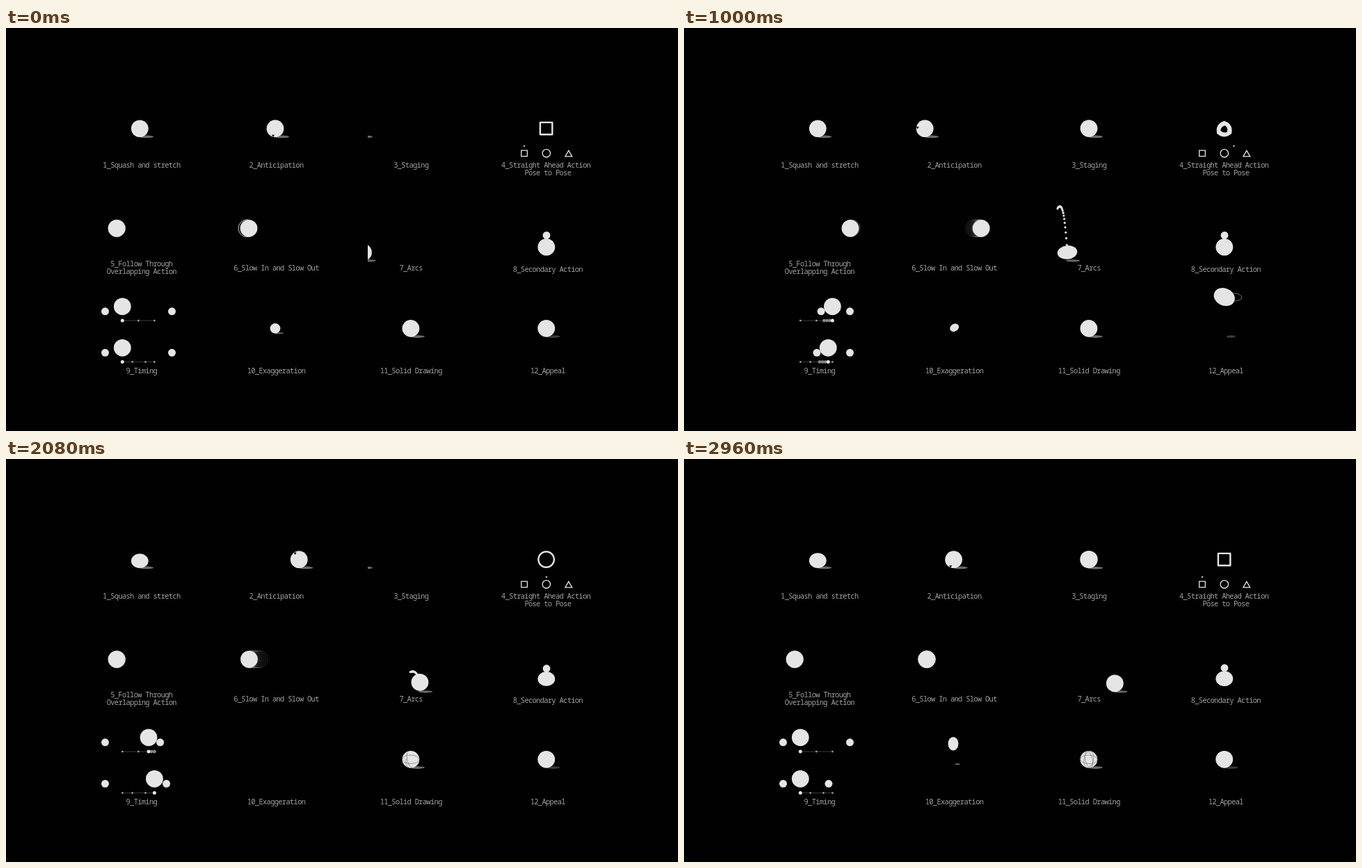
An HTML page with a canvas that plays this animation: 966x580 px, repeating every 3000 ms.

```html
<!DOCTYPE html>
<html lang="en">
<head>
<meta charset="utf-8">
<title>Twelve principles of animation</title>
<style>
  html, body { margin: 0; width: 100%; height: 100%; overflow: hidden; background: #010101; }
  canvas, svg { position: absolute; left: 0; top: 0; }
  text {
    font: 500 10.4px "Noto Sans Mono", "DejaVu Sans Mono", monospace;
    letter-spacing: -.064em; fill: #a2a2a2; text-anchor: middle;
  }
</style>
</head>
<body>
<canvas id="stage" width="966" height="580"></canvas>
<svg width="966" height="580">
  <text x="194.8" y="201.4">1_Squash and stretch</text>
  <text x="388.5" y="201.4">2_Anticipation</text>
  <text x="582.2" y="201.4">3_Staging</text>
  <text x="776" y="201.4">4_Straight Ahead Action</text>
  <text x="778.8" y="212.4">Pose to Pose</text>
  <text x="194.8" y="343.4">5_Follow Through</text>
  <text x="194.8" y="354.4">Overlapping Action</text>
  <text x="388.5" y="349">6_Slow In and Slow Out</text>
  <text x="582.2" y="349">7_Arcs</text>
  <text x="778.8" y="351.4">8_Secondary Action</text>
  <text x="194.8" y="496.5">9_Timing</text>
  <text x="388.5" y="496.5">10_Exaggeration</text>
  <text x="582.2" y="496.5">11_Solid Drawing</text>
  <text x="778.8" y="496.5">12_Appeal</text>
</svg>
<script>
const g = document.getElementById('stage').getContext('2d');
const LOOP = 3000, STEP = 40, R = 12.4, TAU = Math.PI * 2;
const WHITE = '#e5e5e5', GREY = '#6a6a6a', BLACK = '#010101';
const { PI, sin, cos, min, max, abs } = Math;
const clamp = v => min(1, max(0, v));
const mix = (a, b, u) => a + (b - a) * u;
const ramp = (t, start, dur) => clamp((t - start) / dur);
const ease = u => u * u * (3 - 2 * u);
const glide = (t, start, dur) => ease(ramp(t, start, dur));
const pulse = (t, start, dur) => sin(PI * ramp(t, start, dur));

function oval(x, y, rx, ry = rx, rot = 0, from = 0, to = TAU) {
  g.beginPath();
  g.ellipse(x, y, rx, ry, rot, from, to);
}
function ball(x, y, rx = R, ry = rx, rot = 0, color = WHITE) {
  g.fillStyle = color;
  oval(x, y, rx, ry, rot);
  g.fill();
}
function shadow(x, y, rx = 10.5, ry = 1.8, color = GREY) {
  ball(x, y, rx, ry, 0, color);
}
function line(color, width) {
  g.strokeStyle = color;
  g.lineWidth = width;
  g.stroke();
}
function polygon(x, y, r, n, rot) {
  g.beginPath();
  for (let i = 0; i < n; i++) g.lineTo(x + r * cos(rot + i * TAU / n), y + r * sin(rot + i * TAU / n));
  g.closePath();
}
function clipped(x, y, w, h, draw) {
  g.save();
  g.beginPath();
  g.rect(x, y, w, h);
  g.clip();
  draw();
  g.restore();
}

// One jump over phase 0..1: in the air from .16 to .86, squashed on the ground around it.
function jump(p) {
  const q = (p - .16) / .7;
  if (q > 0 && q < 1) {
    const v = abs(2 * q - 1);
    return { dy: -40.3 * (1 - v ** 2.4), ry: R + 5.8 * min(1, 2.2 * v, 5 * (1 - v)) };
  }
  const dip = 2.1 * sin(TAU * ((p + .14) % 1) / .3) ** 2;
  return { dy: dip, ry: R - dip };
}
const shade = ({ dy, ry }) => 5.6 + 4.9 * clamp((37 + dy + ry - R) / 37) ** .65;

function squash(t) {
  const j = jump(t / 1000 % 1);
  shadow(201.8, 156.4, shade(j));
  ball(192.3, 144.6 + j.dy, R, j.ry);
}

// start, duration, distance, turn in degrees
const ROLLS = [[0, 480, 8.5, 54], [540, 620, -59, -397], [1340, 860, 89.5, 501], [2470, 530, -39, -518]];
function anticipation(t) {
  const sum = col => ROLLS.reduce((s, m) => s + m[col] * glide(t, m[0], m[1]), 0);
  const x = 387 + sum(2), a = (106 + sum(3)) * PI / 180;
  shadow(x + 9.7, 156.4);
  ball(x, 144.7);
  polygon(x + 10.6 * cos(a), 144.7 + 10.6 * sin(a), 2.3, 3, PI / 2);
  g.fillStyle = BLACK;
  g.fill();
}

function staging(t) {
  const away = 75 * (1 - glide(t, 40, 440) + glide(t, 1340, 400) - glide(t, 2080, 420));
  const r = R + 1.6 * (pulse(t, 480, 480) + pulse(t, 2510, 480));
  const x = 582 - away, y = 144.6 - 18 * abs(sin(PI * away / 25));
  clipped(520, 80, 130, 90, () => {
    shadow(x + 9.7, 156.4 + r - R, 10.5 * r / R);
    ball(x, y, r);
  });
  const burst = ramp(t, 2510, 220);
  if (burst === 0 || burst === 1) return;
  g.beginPath();
  for (const a of [-.75, -.5, -.25]) {
    for (const d of [17, 21]) g[d < 20 ? 'moveTo' : 'lineTo'](582 + (d + 8 * burst) * cos(a * PI), 144.6 + (d + 8 * burst) * sin(a * PI));
  }
  g.globalAlpha = 1 - burst;
  line(WHITE, 1);
  g.globalAlpha = 1;
}

// Polar outlines: sides, first corner, edge distances, centre shift, corner limit, icon place
const POSES = [
  { n: 4, at: PI / 4, out: 9.9, inn: 7.5, dy: 0, cap: 13.4, x: 745 },
  { n: 0, at: 0, out: 12.4, inn: 10, dy: 0, cap: 20, x: 776.8 },
  { n: 3, at: -PI / 2, out: 6.8, inn: 4.4, dy: 2.9, cap: 13.6, x: 808.8 }
];
function reach(p, edge, a) {
  if (!p.n) return p[edge];
  const w = TAU / p.n, off = ((a - p.at) % w + w) % w;
  return min(p.cap, p[edge] / cos(off - w / 2));
}
function poses(t) {
  const order = [0, 1, 2, 1, 0], k = max(0, Math.floor((t - 25) / 795));
  const u = glide(t, 25 + 795 * k, 400), a = POSES[order[k]], b = POSES[order[k + 1]];
  const bump = sin(PI * u), shrink = 1 - (a.n + b.n === 3 ? .42 : .12) * bump;
  const cx = 776.6, cy = 144.6 + mix(a.dy, b.dy, u);
  g.beginPath();
  for (const edge of ['out', 'inn']) {
    const inner = edge === 'inn', spin = inner ? .25 * bump : 0;
    for (let i = 0; i < 120; i++) {
      const q = i * TAU / 120 - PI / 2, d = mix(reach(a, edge, q), reach(b, edge, q), u);
      const r = inner ? d * shrink : mix(d, 11.3, .5 * bump);
      g[i ? 'lineTo' : 'moveTo'](cx + r * cos(q + spin), cy + r * sin(q + spin));
    }
    g.closePath();
  }
  g.fillStyle = WHITE;
  g.fill('evenodd');

  polygon(745, 180.4, 6.1, 4, PI / 4);
  line(WHITE, 1.3);
  oval(776.8, 180.3, 5.7);
  line(WHITE, 1.3);
  polygon(808.8, 182, 5.7, 3, -PI / 2);
  line(WHITE, 1.3);
  polygon(mix(a.x, b.x, u), 169.8, 1.8, 3, PI / 2);
  g.fillStyle = WHITE;
  g.fill();
}

function swingX(t) {
  return 159.2 + 82.3 * (glide(t, 380, 400) - glide(t, 1210, 360)) - 2.5 * (glide(t, 800, 200) - glide(t, 1570, 200));
}
function swing(t) {
  const v = (swingX(t + 20) - swingX(t - 20)) / STEP, lean = min(1, abs(v) / .2);
  return [swingX(t), 288.3, R + 1.4 * lean, R - 6.1 * lean, (v < 0 ? -1 : 1) * PI / 4];
}
function slide(t) {
  const out = start => 1 - (1 - ramp(t, start, 1000)) ** 2;
  return [t < 0 ? 346.5 : 349 + 78.2 * (out(0) - out(1160)), 288.3, R];
}
function echoes(shape, t, count) {
  g.globalAlpha = .18;
  for (let k = count; k > 0; k--) {
    oval(...shape(t - k * STEP));
    line(WHITE, .8);
  }
  g.globalAlpha = 1;
  ball(...shape(t));
}

const LANDINGS = [0, 470, 1000, 1540, 2090];
function arcPoint(t) {
  const next = LANDINGS.findIndex(l => l > t), i = next - 1;
  const x = max(513.5, 510 + .041 * t - 12 * max(0, (t - 1900) / 1060) ** 2);
  if (next < 1) return { x, up: 0, v: 0, h: 0 };
  const h = 80 - 10.5 * i - 3.5 * i * i, slope = 2 * (t - LANDINGS[i]) / (LANDINGS[next] - LANDINGS[i]) - 1;
  return { x, up: h * (1 - abs(slope) ** 2.5), v: slope, h };
}
function arcs(t) {
  clipped(520, 220, 130, 120, () => {
    const ground = 322.9, p = arcPoint(t);
    const hit = t > 200 && p.h > 40 && p.up < 8;
    const stretch = p.up > 8 ? min(1, p.h / 60) * abs(p.v) ** .5 : 0;
    shadow(p.x + 8, 334.8, 10.5 - p.up / 40, 1.6);
    for (let k = 1; k <= 19; k++) {
      const q = arcPoint(max(0, t - k * 18));
      ball(q.x, ground - q.up, 1.6);
    }
    if (hit) ball(p.x, ground, 14.3, 9.8, -.09);
    else ball(p.x, ground - p.up, R - 2.3 * stretch, R + .8 * stretch, p.v < 0 ? .1 : -.1);
  });
}

function secondary(t) {
  const p = t / 1000 % 1, spins = t < 2000, j = jump(p), x = 776.8;
  const cy = 315.2 + j.dy * .6, ry = spins ? min(j.ry, 13) : j.ry;
  const turn = spins ? abs(cos(PI * ramp(p, .115, .82))) : 1;
  ball(x, cy, max(1, R * turn), ry);
  const sy = min(230.3 + 573 * (p - .54) ** 2, cy - ry - 4.6);
  const grow = p < .86 ? 2.5 * ramp(p, .42, .25) : 0;
  ball(x + .2, sy, 5.4 - grow * .1, 5.4 + grow, spins ? (.54 - p) * 5 : 0);
}

// go and back: when the large ball is pushed right and left again (start, duration)
const ROWS = [
  { y: 400.8, stops: [0, .5, 1], go: [540, 460], back: [2000, 440] },
  { y: 460.3, stops: [0, .31, .72, 1], go: [610, 450], back: [2120, 620] }
];
function timing(t) {
  const from = 167.3, span = 46.1, gap = 8.5;
  for (const { y, stops, go, back } of ROWS) {
    const ly = y + 20.3, at = s => from + span * (ramp(s, ...go) - ramp(s, ...back));
    const left = 142.5 + gap * ramp(t, go[0] - 80, 80) + span * ramp(t, ...go)
      - (span + gap) * ramp(t, go[0] + go[1], 400);
    const right = 238.5 - gap * ramp(t, back[0] - 600, 600) - span * ramp(t, ...back)
      + (span + gap) * ramp(t, back[0] + back[1], 500);
    g.beginPath();
    g.moveTo(from, ly);
    g.lineTo(from + span, ly);
    line('#666', .6);
    for (const s of stops) ball(from + span * s, ly, 1.3, 1.3, 0, '#aaa');
    for (let k = 3; k > 0; k--) {
      const x = at(t - k * STEP);
      if (x !== at(t)) ball(x, ly, 2.3, 2.3, 0, '#888');
    }
    ball(at(t), ly, 2.5);
    ball(left, y + 7, 5.5);
    ball(right, y + 7, 5.5);
    ball(at(t), y);
  }
}

// Jumps, crouches, shoots out through the top and drops back in.
function exaggeration(t) {
  clipped(320, 370.5, 130, 80, () => {
    if (t >= 960 && t < 2440) {
      const shot = max(0, (t - 1340) / 100);
      ball(388.7 - 34 * shot, 431.3 - 58 * shot, 6.8, mix(5.3, 6.2, min(1, shot)), -.55);
      return;
    }
    const k = .597, j = jump(t < 960 ? t / 1000 : max(0, t - 2560) / 1000);
    const drop = t < 960 ? 0 : 70 * (1 - ramp(t, 2440, 120));
    shadow(393, 439.3, shade(j) * k, 1);
    ball(387, 432.3 + j.dy * k - drop, R * k, j.ry * k);
  });
}

function solid(t) {
  const p = t < 1000 ? t / 1000 : 0, j = jump(p), x = 581.9, y = 432.3;
  shadow(x + 9.5, 444.1, shade(j));
  ball(x, y + j.dy * 1.2, R, j.ry, PI * ramp(p, .16, .64));
  const wires = [[12.2, 6.2, .03, 1160], [5.2, 12.2, -.22, 1880], [6.8, 12.2, .2, 1960]];
  for (const [rx, ry, rot, start] of wires) {
    oval(x, y, rx, ry, rot, PI / 2, PI / 2 + TAU * ramp(t, start, 480));
    line('#777', .7);
  }
}

function appeal(t) {
  const lift = glide(t, 200, 320) - glide(t, 1160, 190), x = 776.7;
  const dip = pulse(t, 40, 180) + pulse(t, 1340, 220);
  const ry = R + 5.2 * lift * (1 - .4 * ramp(t, 640, 360)) - 3.3 * dip;
  shadow(x + 9.5, 444.1, 10.3 - 3.8 * lift, 1.8, '#3a3a3a');
  if (t > 480 && t < 1200) {
    oval(789, 387.2, 13, 5.8, .06, -PI / 2, -PI / 2 + PI * ramp(t, 480, 320));
    line('#888', .8);
  }
  ball(x, 432.3 - 45.2 * lift + 4.3 * dip, R, ry, lift ? -.00115 * t : 0);
}

function frame(now) {
  const t = Math.floor(now % LOOP / STEP) * STEP;
  g.fillStyle = BLACK;
  g.fillRect(0, 0, 966, 580);
  for (const part of [squash, anticipation, staging, poses, arcs, secondary, timing, exaggeration, solid, appeal]) part(t);
  echoes(swing, t, 4);
  echoes(slide, t, 9);
}

const start = performance.now();
(function loop() {
  frame(performance.now() - start);
  requestAnimationFrame(loop);
})();
</script>
</body>
</html>
```
